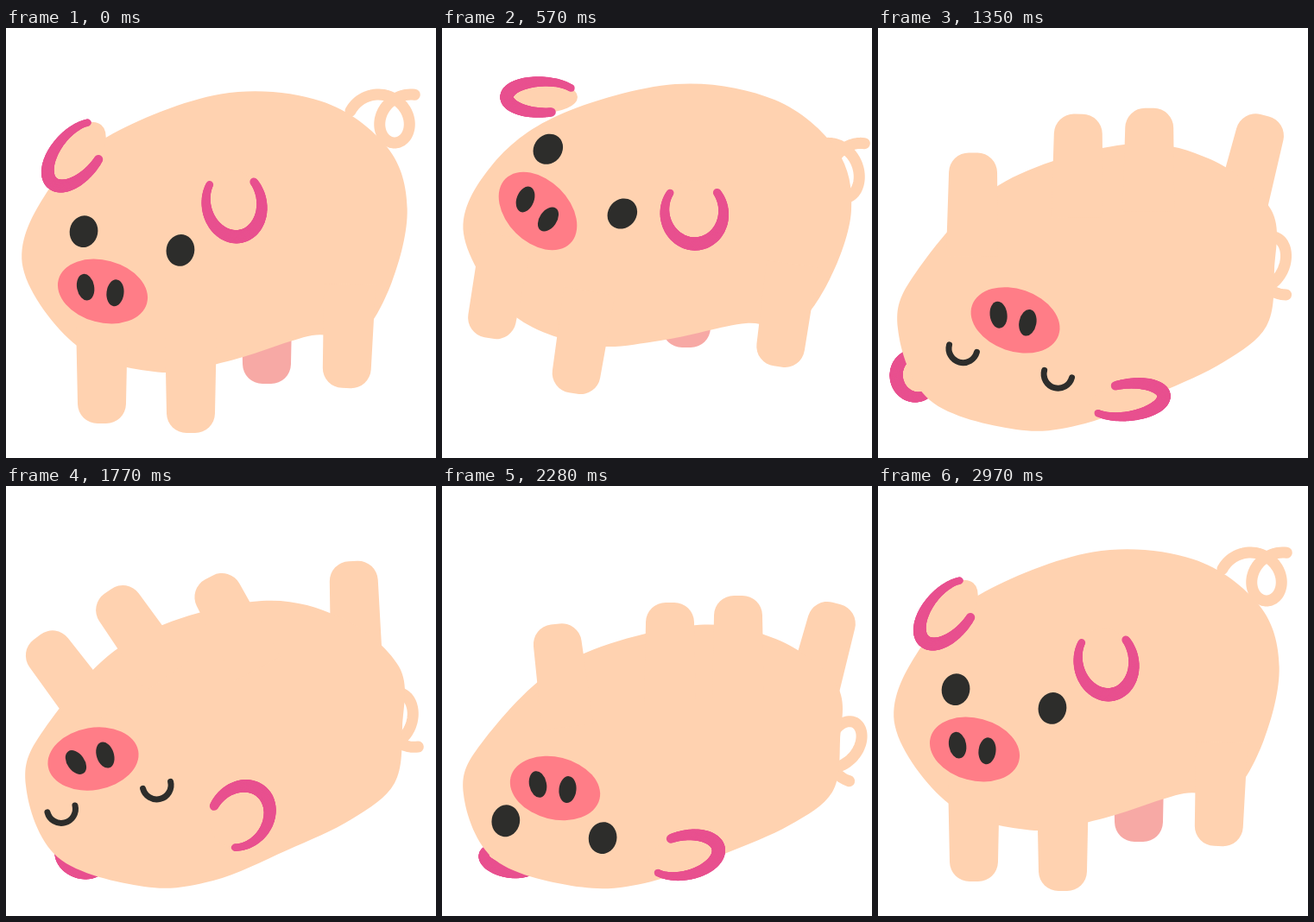
These frames come from a looping animation (498x498 px, 3.21 s). An HTML page with a canvas:

```html
<!DOCTYPE html>
<html lang="en">
<head>
<meta charset="utf-8">
<title>Rolling pig</title>
<style>
  html, body { margin: 0; width: 100%; height: 100%; overflow: hidden; background: #fff; }
  canvas { display: block; }
</style>
</head>
<body>
<canvas id="stage" width="498" height="498"></canvas>
<script>
const ctx = document.getElementById('stage').getContext('2d');
const SKIN = '#ffd2b0', PINK = '#e8508f', SNOUT = '#ff7d87', DARK = '#2d2d2b', SHADE = '#f7a9a5';
const LOOP = 3210, STEP = 30, RAD = Math.PI / 180;

// The belly-down and belly-up outlines; every pose blends and moves these.
const UPRIGHT = [[20,252], [52,174], [130,115], [265,79], [380,97], [452,155], [469,225],
                 [444,305], [400,362], [347,356], [248,376], [165,381], [75,344]];
const FLIPPED = [[23,348], [44,283], [140,182], [285,135], [385,152], [455,210], [459,280],
                 [450,345], [400,387], [325,423], [240,458], [160,465], [60,431]];
const MID = [245, 265];

// body: shift x,y, turn, stretch, blend    face: x, y, turn
// ears: x, y, turn, half width, depth      tail: x, y, turn, stretch
// legs A, B in front, C, D behind: tip x, y, turn
const stand = {
  body: [0, 6, -5, 1.04, 0], face: [112, 305, 11],
  earA: [82, 146, 40, 24, 44], earB: [264, 203, -12, 32, 39], tail: [450, 105, 0, 1],
  legA: [111, 458, 0], legB: [214, 469, 0], legC: [302, 412, 0], legD: [394, 417, 2]
};
const lift = {
  body: [5, -14, 0, 1, 0], face: [111, 212, 41],
  earA: [116, 80, 90, 18, 41], earB: [292, 213, -8, 34, 37], tail: [466, 165, 0, 1.13],
  legA: [54, 359, 10], legB: [152, 423, 9], legC: [283, 370, 0], legD: [389, 392, 8]
};
const right = {
  body: [0, 0, 0, 1, 1], face: [158, 338, 194.5],
  earA: [288, 430, 262, 19, 43], earB: [45, 403, 80, 25, 23], tail: [454, 274, 8, -1.15],
  legA: [230, 100, 180], legB: [109, 145, 180], legC: [447, 101, 194], legD: [313, 93, 180]
};
const left = {
  body: [0, -1, 0, 1, 1], face: [101, 316, 166],
  earA: [271, 383, 220, 32, 38], earB: [88, 428, 20, 26, 19], tail: [454, 271, 0, -1.12],
  legA: [118, 122, 145], legB: [36, 175, 143], legC: [402, 87, 178], legD: [235, 106, 152]
};
const wake = {
  body: [2, 16, 0, 0.918, 1], face: [131, 350, 190],
  earA: [280, 428, 258, 23, 41], earB: [78, 432, 10, 30, 14], tail: [464, 303, 25, -1.15],
  legA: [264, 135, 180], legB: [131, 160, 173], legC: [457, 136, 195], legD: [343, 127, 180]
};
const up = {
  ...stand,
  body: [0, 0, 0, 1, 0], face: [107, 266, 21],
  earA: [102, 105, 88, 18, 42], earB: [293, 187, -25, 36, 30], tail: [453, 158, 0, 1.1],
  legA: [104, 448, 0], legB: [221, 464, -2]
};

function mix(a, b, k) {
  const out = {};
  for (const part in a) out[part] = a[part].map((v, i) => v + (b[part][i] - v) * k);
  return out;
}

const roll = {
  ...mix(lift, right, 0.45),
  face: [78, 255, 100], earB: [230, 410, 50, 30, 34],
  legA: [3, 225, 100], legB: [22, 330, 70]
};

const keys = [
  [0, stand], [180, stand], [570, lift], [690, roll], [930, right],
  [1245, mix(left, right, 1.12)], [1770, left], [1860, mix(right, left, 1.05)],
  [2280, wake], [2390, mix(roll, up, 0.2)], [2460, lift], [2520, up],
  [2970, stand], [LOOP, stand]
];

// Monotone cubic through the keys: smooth, and never past a turning point.
function tangent(part, n, i) {
  if (i < 1 || i > keys.length - 2) return 0;
  const [ta, a] = keys[i - 1], [tb, b] = keys[i], [tc, c] = keys[i + 1];
  const p = (b[part][n] - a[part][n]) / (tb - ta);
  const q = (c[part][n] - b[part][n]) / (tc - tb);
  return p * q > 0 ? 2 * p * q / (p + q) : 0;
}

function poseAt(t) {
  let i = 0;
  while (i < keys.length - 2 && t >= keys[i + 1][0]) i++;
  const [t0, a] = keys[i], [t1, b] = keys[i + 1];
  const d = t1 - t0, s = (t - t0) / d, s2 = s * s, s3 = s2 * s;
  const out = {};
  for (const part in a) {
    out[part] = a[part].map((v, n) =>
      (2 * s3 - 3 * s2 + 1) * v + (3 * s2 - 2 * s3) * b[part][n] +
      d * ((s3 - 2 * s2 + s) * tangent(part, n, i) + (s3 - s2) * tangent(part, n, i + 1)));
  }
  return out;
}

// Draws in a frame moved to x,y and turned by deg.
function within(x, y, deg, paint) {
  ctx.save();
  ctx.translate(x, y);
  ctx.rotate(deg * RAD);
  paint();
  ctx.restore();
}

function oval(x, y, rx, ry, deg, color) {
  ctx.beginPath();
  ctx.ellipse(x, y, rx, ry, deg * RAD, 0, 7);
  ctx.fillStyle = color;
  ctx.fill();
}

function drawBody([dx, dy, deg, stretch, blend]) {
  const pts = UPRIGHT.map((p, i) => p.map((v, k) => v + (FLIPPED[i][k] - v) * blend - MID[k]));
  const n = pts.length, at = i => pts[(i + n) % n];
  within(MID[0] + dx, MID[1] + dy, 0, () => {
    ctx.scale(1, stretch);
    ctx.rotate(deg * RAD);
    ctx.beginPath();
    ctx.moveTo(...pts[0]);
    for (let i = 0; i < n; i++) {
      const a = at(i - 1), b = at(i), c = at(i + 1), e = at(i + 2);
      ctx.bezierCurveTo(b[0] + (c[0] - a[0]) / 6, b[1] + (c[1] - a[1]) / 6,
        c[0] - (e[0] - b[0]) / 6, c[1] - (e[1] - b[1]) / 6, c[0], c[1]);
    }
    ctx.fillStyle = SKIN;
    ctx.fill();
  });
}

function drawLeg([x, y, deg], color) {
  within(x, y, deg, () => {
    ctx.beginPath();
    ctx.moveTo(-30, -120);
    ctx.arcTo(-27.5, 0, 0, 0, 23);
    ctx.arcTo(27.5, 0, 30, -120, 23);
    ctx.lineTo(30, -120);
    ctx.fillStyle = color;
    ctx.fill();
  });
}

// A hook along part of an ellipse, thickest at its tip.
function drawEar([x, y, deg, w, depth], from, to) {
  within(x, y, deg, () => {
    oval(0, 0, w, depth, 0, SKIN);
    for (let a = from; a <= to; a += 2) {
      const s = Math.sin(a * RAD), r = 5.7 + 2 * s;
      oval(w * Math.cos(a * RAD), depth * s, r, r, 0, PINK);
    }
  });
}

// A looping trochoid.
function drawTail([x, y, deg, stretch]) {
  within(x, y, deg, () => {
    ctx.beginPath();
    for (let a = -1.4 * Math.PI; a < 1.05 * Math.PI; a += 0.08) {
      ctx.lineTo(6 * a - 26 * Math.sin(a), 28 * stretch * Math.cos(a));
    }
    ctx.lineWidth = 13;
    ctx.strokeStyle = SKIN;
    ctx.stroke();
  });
}

function drawEye(x, y, open) {
  if (open) return oval(x, y, 16.3, 18.5, 0, DARK);
  ctx.beginPath();
  ctx.arc(x, y, 16.5, Math.PI, 0);
  ctx.lineWidth = 7;
  ctx.strokeStyle = DARK;
  ctx.stroke();
}

function drawFace([x, y, deg], open) {
  const lean = Math.cos(deg * RAD);
  within(x, y, deg, () => {
    oval(0, 0, 53, 36, 4, SNOUT);
    for (const side of [-1, 1]) {
      drawEye(7.5 + 15 * lean + side * 57, -55.5 - 8.5 * lean, open);
      oval(side * 17.5 - 3 * lean, -lean, 10, 15.5, 9 * side * lean - 13, DARK);
    }
  });
}

function draw(t) {
  const p = poseAt(t), turn = p.face[2];
  const earB = () => drawEar(p.earB, -30, 225);
  ctx.fillStyle = '#fff';
  ctx.fillRect(0, 0, 498, 498);
  ctx.lineCap = ctx.lineJoin = 'round';

  drawTail(p.tail);
  drawLeg(p.legC, turn > 80 ? SKIN : SHADE);
  if (turn > 105) earB();
  drawBody(p.body);
  for (const leg of [p.legA, p.legB, p.legD]) drawLeg(leg, SKIN);
  drawEar(p.earA, -15, 235);
  if (turn <= 105) earB();
  drawFace(p.face, t < 750 || t >= 2190);
}

const start = performance.now();
function tick() {
  const t = (performance.now() - start) % LOOP;
  draw(Math.floor(t / STEP) * STEP);
  requestAnimationFrame(tick);
}
tick();
</script>
</body>
</html>
```
